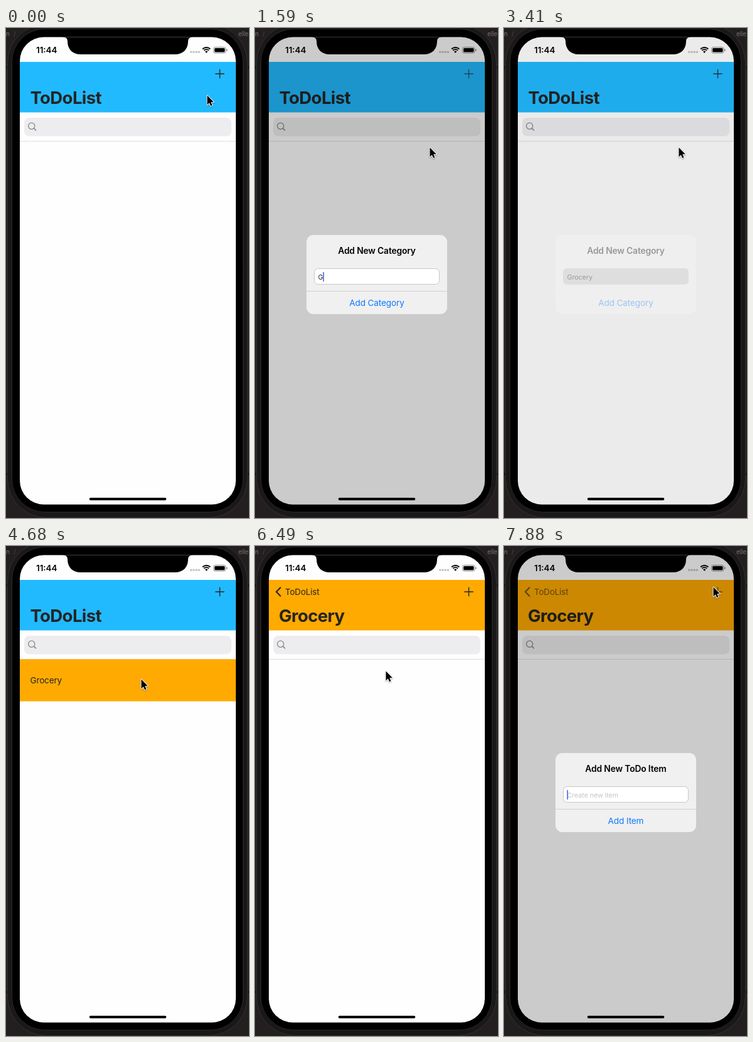
Write an HTML page with a canvas that moves like this. It is 387 px wide and 781 px high and loops after 8 s.

```html
<!DOCTYPE html>
<html lang="en">
<head>
<meta charset="utf-8">
<title>ToDoList</title>
<style>
html, body { margin: 0; width: 100%; height: 100%; overflow: hidden; background: #231f20; }
canvas { display: block; width: 387px; height: 781px; }
</style>
</head>
<body>
<canvas id="stage"></canvas>
<script>
const W = 387, H = 781, LOOP = 8000;
const INK = '#242424', BLUE = '#22baff', ORANGE = '#ffaa00';
const canvas = document.getElementById('stage');
const c = canvas.getContext('2d');
const dpr = window.devicePixelRatio || 1;
canvas.width = W * dpr;
canvas.height = H * dpr;

const clamp = v => Math.max(0, Math.min(1, v));
const mix = (a, b, p) => a + (b - a) * p;

// Progress of a change shown in n equal steps, the first one at a, the last at b
const stepped = (t, a, b, n) =>
  t < a ? 0 : clamp((Math.floor((t - a) / (b - a) * (n - 1) + 1e-6) + 1) / n);

function box(x, y, w, h, r, fill, stroke) {
  c.beginPath();
  c.roundRect(x, y, w, h, r);
  if (fill) { c.fillStyle = fill; c.fill(); }
  if (stroke) { c.strokeStyle = stroke; c.lineWidth = 1; c.stroke(); }
}

function line(points, color, width) {
  c.beginPath();
  points.forEach(([x, y]) => c.lineTo(x, y));
  c.strokeStyle = color;
  c.lineWidth = width;
  c.stroke();
}

function text(s, x, y, size, { weight = 400, color = INK, align = 'left', track = -0.01 } = {}) {
  c.font = `${weight} ${size}px Inter, Roboto, sans-serif`;
  c.letterSpacing = `${track * size}px`;
  c.textAlign = align;
  c.fillStyle = color;
  c.fillText(s, x, y);
  return c.measureText(s).width;
}

function faded(alpha, draw) {
  if (alpha <= 0) return;
  c.save();
  c.globalAlpha *= clamp(alpha);
  draw();
  c.restore();
}

function shell() {
  c.fillStyle = '#231f20';
  c.fillRect(0, 0, W, H);
  text('n', 0, 13, 10, { color: '#77716f' });
  text('/', 12, 13, 10, { color: '#4c4747' });
  text('elle', 370, 13, 10, { color: '#77716f' });
  c.fillStyle = '#121011';
  c.fillRect(0, 61, 5, 4);
  c.fillRect(0, 709, 5, 4);
  c.fillRect(382, 61, 5, 4);
  c.fillRect(382, 709, 5, 4);
  c.fillRect(68, 776, 5, 5);
  box(2.5, -6.5, 382, 787, 62, '#1a1819', '#343132');
  box(9.5, 1.5, 368, 770, 52, '#000', '#2b2929');
}

function screenPath() {
  c.beginPath();
  c.roundRect(22, 14.5, 344, 745, 38);
}

function listPage(x, row, selected) {
  c.save();
  c.translate(x, 0);
  c.fillStyle = '#fefefe';
  c.fillRect(22, 14, 344, 746);
  box(29, 143, 330, 29.5, 8, '#ededef');
  c.beginPath();
  c.arc(40.7, 156.2, 5.1, 0, 7);
  c.strokeStyle = '#85858a';
  c.lineWidth = 1.3;
  c.stroke();
  line([[44.4, 159.9], [48, 163.4]], '#85858a', 1.5);
  c.fillStyle = '#dedee0';
  c.fillRect(22, 180, 344, 1);
  if (row) {
    c.fillStyle = ORANGE;
    c.fillRect(22, 180.5, 344, 67);
    faded(selected, () => {
      c.fillStyle = '#d1d1d6';
      c.fillRect(22, 180.5, 344, 67);
    });
    text('Grocery', 38.5, 219, 13.5);
  }
  c.restore();
}

function navBar(p, pushed, dim) {
  c.fillStyle = pushed ? ORANGE : BLUE;
  c.fillRect(22, 54, 344, 80.5);
  const big = { weight: 700, track: -0.022 };
  const tint = 1 - 0.35 * dim;

  // The large title shrinks into the back button
  const x = mix(38.5, 48, p), y = mix(121, 78, p);
  faded(1 - p * 1.4, () => text('ToDoList', x, y, mix(27.5, 13.4, p), big));
  if (pushed) {
    faded(p * p * tint, () => text('ToDoList', x, y, mix(27.5, 13.4, p)));
    text('Grocery', 38 + 375 * (1 - p), 121, 27.5, big);
    faded((p - 0.9) * 10 * tint, () =>
      line([[41, 65.7], [34, 73], [41, 80.3]], INK, 2.1));
  }
  faded(tint, () => {
    line([[333.3, 73], [347.7, 73]], INK, 1.4);
    line([[340.5, 65.8], [340.5, 80.2]], INK, 1.4);
  });
}

function statusBar() {
  text('11:44', 48, 40, 13.4, { weight: 600, color: '#000', track: 0 });
  c.fillStyle = '#c2c2c4';
  for (let i = 0; i < 4; i++) {
    c.beginPath();
    c.arc(294.8 + i * 4.2, 38.3, 1.7, 0, 7);
    c.fill();
  }
  c.strokeStyle = c.fillStyle = '#000';
  c.lineWidth = 1.9;
  for (const r of [8.6, 5.5]) {
    c.beginPath();
    c.arc(319.2, 39.6, r, -Math.PI * 0.75, -Math.PI * 0.25);
    c.stroke();
  }
  c.beginPath();
  c.moveTo(319.2, 40);
  c.arc(319.2, 39.6, 3, -Math.PI * 0.75, -Math.PI * 0.25);
  c.fill();
  box(330.5, 30.5, 19.5, 9.5, 2.8, null, '#8e8e90');
  box(332, 32, 16.5, 6.5, 1.5, '#000');
  box(351.2, 33.6, 1.4, 3.4, 0.7, '#8e8e90');
}

function notch() {
  c.beginPath();
  c.moveTo(91, 13);
  c.lineTo(91, 14.5);
  c.quadraticCurveTo(98, 14.5, 98, 21);
  c.bezierCurveTo(98, 34, 106, 42, 119, 42);
  c.lineTo(269, 42);
  c.bezierCurveTo(282, 42, 290, 34, 290, 21);
  c.quadraticCurveTo(290, 14.5, 297, 14.5);
  c.lineTo(297, 13);
  c.fillStyle = '#000';
  c.fill();
}

function alertBox(a) {
  faded(a.alpha, () => {
    c.translate(194, 393);
    c.scale(a.scale, a.scale);
    c.translate(-194, -393);
    box(82, 330, 224, 126, 11, a.closing ? '#f5f5f5' : '#f0f0f0');
    text(a.title, 194, 360, 13.8, { weight: 600, color: '#000', align: 'center' });
    if (a.closing) box(94, 383, 200, 26, 6, '#c0c0c2');
    else box(94.5, 383.5, 199, 25, 6, '#fff', '#c6c6c8');
    c.fillStyle = a.closing ? '#ebebeb' : '#d0d0d2';
    c.fillRect(82, 419, 224, 1);
    text(a.action, 194, 443, 13.6, { color: '#0a7aff', align: 'center' });
    const typed = { color: '#222', track: 0 };
    const width = a.value
      ? text(a.value, 100.5, 400.5, 10.6, typed)
      : (text(a.hint, 100.5, 400.5, 10.6, { color: '#c4c4c7', track: 0 }), 0);
    if (!a.closing) faded(a.caret, () => {
      c.fillStyle = '#4468e4';
      c.fillRect(100.4 + width, 389, 1.6, 15);
    });
  });
}

const keyTimes = [1590, 1830, 1950, 2190, 2310, 2460, 2700];
const easeOut = p => 1 - (1 - p) ** 2;

function currentAlert(t) {
  if (t < 3520) {
    const show = easeOut(stepped(t, 60, 410, 7));
    const hide = stepped(t, 3240, 3520, 6);
    return {
      title: 'Add New Category', action: 'Add Category', hint: 'Create new category',
      value: 'Grocery'.slice(0, keyTimes.filter(k => t >= k).length),
      caret: 1 - stepped(t, 610, 700, 3) + stepped(t, 960, 1050, 3),
      alpha: hide ? 1 - hide ** 1.12 : show,
      scale: 1.15 - 0.15 * show, closing: hide > 0
    };
  }
  const show = easeOut(stepped(t, 7520, 7880, 8));
  return {
    title: 'Add New ToDo Item', action: 'Add Item', hint: 'Create new item',
    value: '', caret: 1, alpha: show, scale: 1.15 - 0.15 * show, closing: false
  };
}

// Critically damped spring, sampled at the push transition's steps
function pushProgress(t) {
  if (t >= 5970) return 1;
  const s = (stepped(t, 5340, 5970, 11) * 11 - 1) * 0.063 - 0.05;
  if (s <= 0) return 0;
  const k = 14.4 * s;
  return 1 - (1 + k) * Math.exp(-k);
}

const path = [
  [0, 320.5, 107], [60, 320.5, 107], [410, 278.5, 190],
  [4085, 278.5, 190], [4250, 215, 191],
  [4575, 215, 191], [4680, 215.5, 212],
  [6270, 215.5, 212], [6490, 208.5, 199], [6720, 325.5, 91.5],
  [7045, 325.5, 91.5], [7310, 333.5, 65], [8000, 333.5, 65]
];

function pointer(t) {
  const i = path.findIndex(k => k[0] > t);
  const [t0, x0, y0] = path[i - 1], [t1, x1, y1] = path[i];
  const p = (t - t0) / (t1 - t0), e = p * p * (3 - 2 * p);
  c.save();
  c.translate(mix(x0, x1, e), mix(y0, y1, e));
  c.beginPath();
  [[0, 0.6], [0, 15.4], [3.3, 12.3], [5.6, 17.3], [8, 16.2], [5.8, 11.3], [10.3, 11]]
    .forEach(([x, y]) => c.lineTo(x, y));
  c.closePath();
  c.shadowColor = 'rgba(0,0,0,.35)';
  c.shadowBlur = 2 * dpr;
  c.shadowOffsetY = dpr;
  c.strokeStyle = '#fff';
  c.lineWidth = 2;
  c.lineJoin = 'round';
  c.stroke();
  c.shadowColor = 'transparent';
  c.fillStyle = '#000';
  c.fill();
  c.restore();
}

function draw(t) {
  const p = pushProgress(t);
  const popup = currentAlert(t);
  c.setTransform(dpr, 0, 0, dpr, 0, 0);
  shell();
  c.save();
  screenPath();
  c.clip();
  if (p < 1) listPage(-103 * p, t >= 3750, t >= 5340 ? 0.65 : 0);
  if (p > 0) {
    c.fillStyle = `rgba(0,0,0,${0.1 * p})`;
    c.fillRect(22, 14, 344, 746);
    listPage(344 * (1 - p), false, 0);
  }
  navBar(p, p > 0, popup.alpha);
  statusBar();
  c.fillStyle = `rgba(0,0,0,${0.2 * popup.alpha})`;
  c.fillRect(22, 14, 344, 746);
  alertBox(popup);
  box(132.7, 748.7, 122.6, 4, 2, '#000');
  notch();
  c.restore();
  pointer(t);
}

const start = performance.now();
function tick() {
  draw((performance.now() - start) % LOOP);
  requestAnimationFrame(tick);
}
tick();
</script>
</body>
</html>
```
